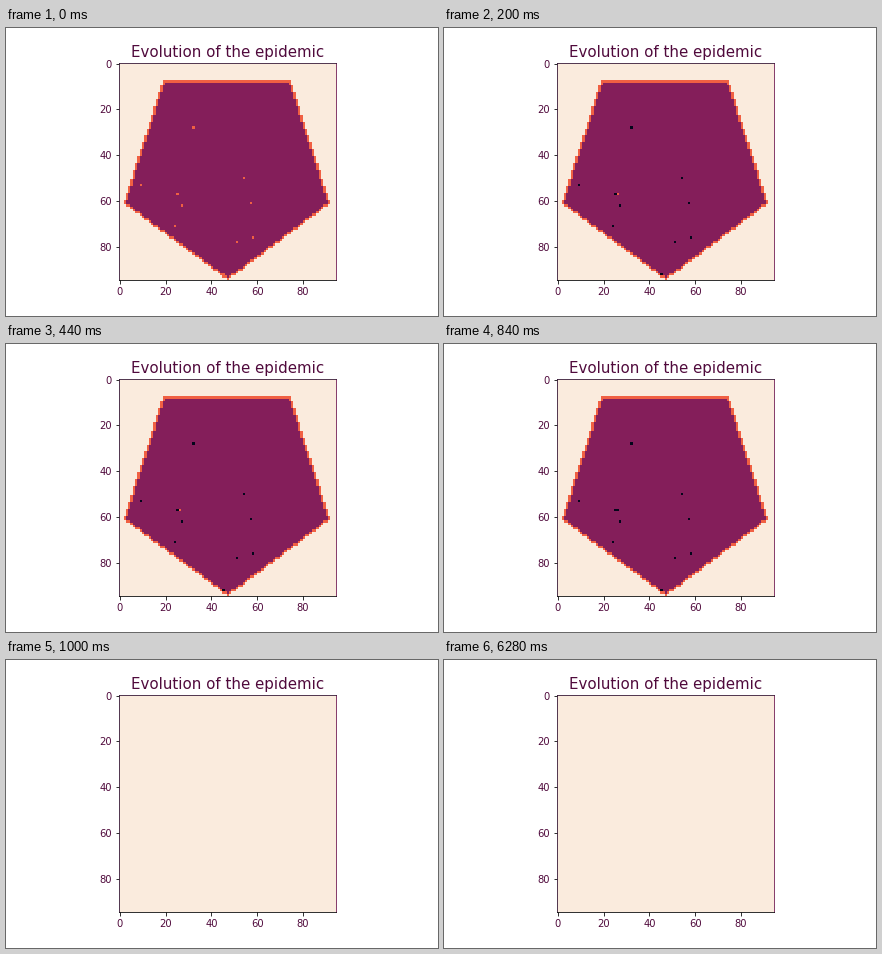
A matplotlib script for the animation above (9.8 s loop, 432x288 px).

```python
import numpy as np
import matplotlib.pyplot as plt
from matplotlib.animation import FuncAnimation
from matplotlib.colors import ListedColormap
from matplotlib.path import Path

SIZE = 95
STEP_MS = 200
STEPS = 49
DEAD, HEALTHY, SICK, EMPTY = range(4)
COLORS = ListedColormap(["#03051a", "#841e5a", "#f06043", "#faebdd"])
INK = "#500a3c"

# (column, row) of the first cases, and the one cell they infect
FIRST = [(32, 28), (54, 50), (9, 53), (25, 57), (57, 61),
         (27, 62), (24, 71), (58, 76), (51, 78), (45, 92)]
SECOND = [(26, 57)]


def pentagon(center=47, radius=47):
    angles = np.arange(5) * 2 * np.pi / 5
    x = center + radius * np.sin(angles)
    y = center + radius * np.cos(angles)
    return np.column_stack([x, y]).astype(int)


def country():
    corners = pentagon()
    rows, cols = np.mgrid[:SIZE, :SIZE]
    cells = np.column_stack([cols.ravel(), rows.ravel()])
    inside = Path(corners).contains_points(cells).reshape(SIZE, SIZE)
    grid = np.where(inside, HEALTHY, EMPTY)
    for a, b in zip(corners, np.roll(corners, -1, axis=0)):
        count = np.abs(b - a).max() + 1
        line = np.rint(np.linspace(a, b, count)).astype(int)
        grid[line[:, 1], line[:, 0]] = SICK
    return grid


def mark(grid, cells, state):
    for col, row in cells:
        grid[row, col] = state


LAND = country()


def state_at(step):
    if step >= 5:
        return np.full((SIZE, SIZE), EMPTY)
    grid = LAND.copy()
    mark(grid, FIRST, SICK if step == 0 else DEAD)
    if step >= 1:
        mark(grid, SECOND, SICK if step < 3 else DEAD)
    return grid


fig, ax = plt.subplots(figsize=(6, 4), dpi=72, facecolor="white")
fig.subplots_adjust(left=0.125, right=0.9, bottom=0.125, top=0.88)
plt.rcParams["font.family"] = "DejaVu Sans"

image = ax.imshow(state_at(0), cmap=COLORS, vmin=0, vmax=3,
                  interpolation="nearest")
ax.set_title("Evolution of the epidemic", fontsize=15, color=INK, pad=6)
ax.set_xticks(range(0, SIZE, 20))
ax.set_yticks(range(0, SIZE, 20))
ax.tick_params(labelsize=10, labelcolor=INK, color="black")
ax.spines["right"].set_color("#6c1450")
ax.spines["top"].set_color("#2b0c2e")
ax.spines["left"].set_color("#2b0c2e")


def update(step):
    image.set_data(state_at(step))
    return [image]


anim = FuncAnimation(fig, update, frames=STEPS, interval=STEP_MS,
                     repeat=True, repeat_delay=0)
plt.show()
```
